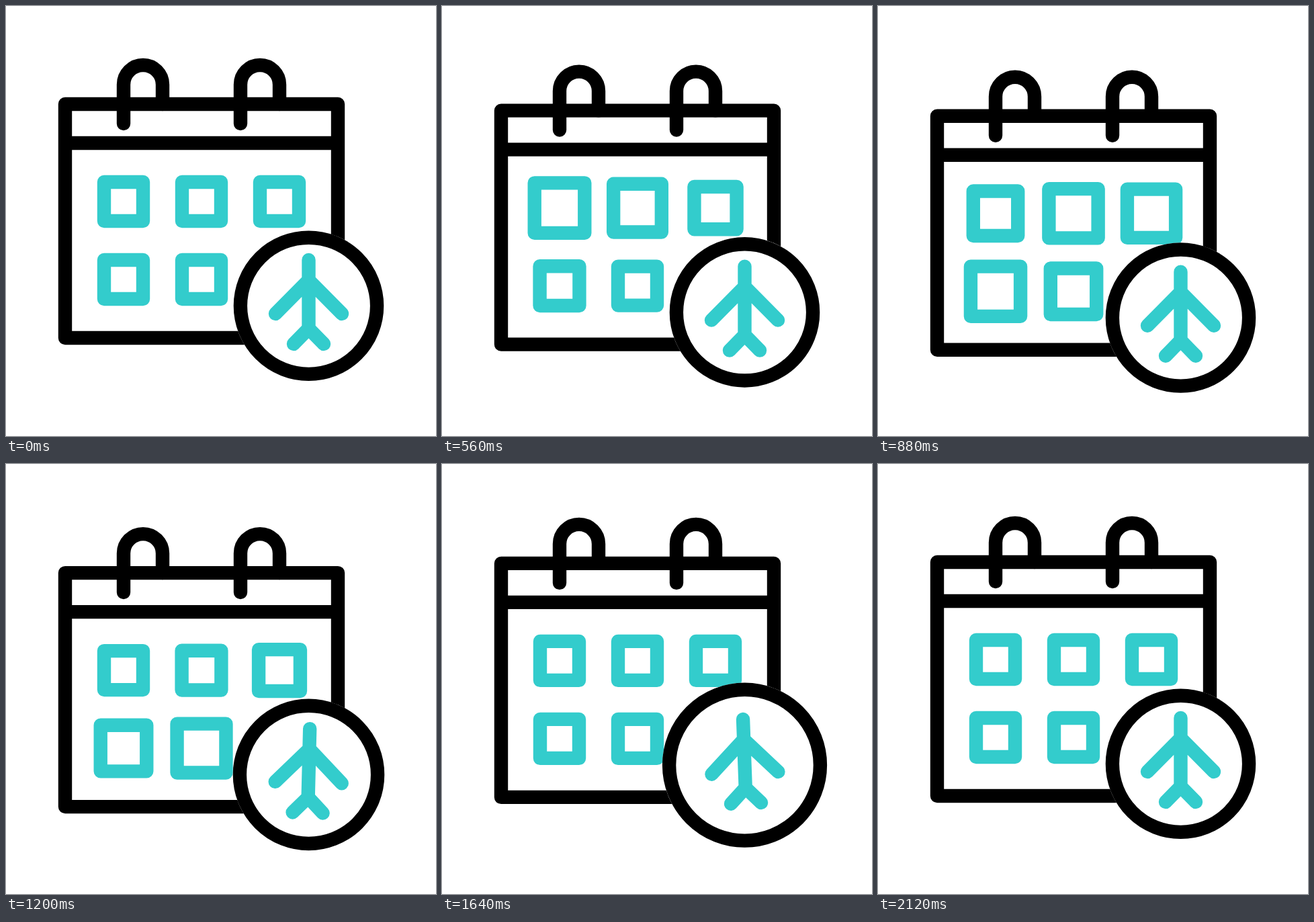
Animation, 640 px wide and 640 px high, one loop 2.24 s. Source, as an HTML page:

```html
<!DOCTYPE html>
<html lang="en">
<head>
<meta charset="utf-8">
<title>Travel calendar</title>
<style>
  html, body { margin: 0; width: 100%; height: 100%; overflow: hidden; background: #fff; }
  svg { display: block; width: 100%; height: 100%; }
  .line { fill: none; stroke: #000; stroke-width: 20.4; stroke-linecap: round; stroke-linejoin: round; }
  .accent { stroke: #33cccc; }
</style>
</head>
<body>
<svg viewBox="0 0 640 640">
  <g id="scene">
    <g class="line">
      <path d="M88 146H494V494H88ZM88 204H494"/>
      <path d="M175 175V117a29 29 0 0 1 58 0V146"/>
      <path d="M349 175V117a29 29 0 0 1 58 0V146"/>
    </g>
    <g id="days"></g>
    <circle id="disc" cx="450.5" cy="446.3" fill="#fff"/>
    <circle id="ring" class="line" cx="450.5" cy="446.3"/>
    <path id="plane" class="line accent" d="M450.5 378V480M401 458L450.5 408L500 458M428 503L450.5 480L473 503"/>
  </g>
</svg>
<script>
const LOOP = 2240, STEP = 40, PULSE = 435;
const byId = id => document.getElementById(id);
const scene = byId('scene'), disc = byId('disc'), ring = byId('ring'), plane = byId('plane');

// Center, start and end of the pulse in ms, growth in px
const days = [
  { x: 175, y: 291, start: 138, end: 1100, grow: 16.6 },
  { x: 291, y: 291, start: 232, end: 1269, grow: 15.6 },
  { x: 407, y: 291, start: 378, end: 1357, grow: 14.2 },
  { x: 175, y: 407, start: 490, end: 1453, grow: 16.5 },
  { x: 291, y: 407, start: 616, end: 1585, grow: 15.3 }
];
for (const day of days) {
  day.node = document.createElementNS('http://www.w3.org/2000/svg', 'path');
  day.node.setAttribute('class', 'line accent');
  byId('days').append(day.node);
}

// Cubic ease-in-out with handles at .42 and .58
function ease(u) {
  if (u <= 0) return 0;
  if (u >= 1) return 1;
  let lo = 0, hi = 1;
  for (let i = 0; i < 24; i++) {
    const s = (lo + hi) / 2, r = 1 - s;
    const x = 3 * r * r * s * 0.42 + 3 * r * s * s * 0.58 + s * s * s;
    if (x < u) lo = s; else hi = s;
  }
  return lo * lo * (3 - 2 * lo);
}

const ramp = (t, from, to) => ease((t - from) / (to - from));
const pulse = (t, start, end, span = PULSE) =>
  ramp(t, start, start + span) - ramp(t, end - span, end);

function draw(t) {
  const drop = 18 * pulse(t, 140, 1824, 808);
  scene.setAttribute('transform', `translate(0 ${drop})`);

  for (const { node, x, y, start, end, grow } of days) {
    const side = 58 + grow * pulse(t, start, end);
    node.setAttribute('d', `M${x - side / 2} ${y - side / 2}h${side}v${side}h${-side}z`);
  }

  const radius = 101.6 + 10.8 * pulse(t, 1108, 2100);
  ring.setAttribute('r', radius);
  disc.setAttribute('r', radius + 10.2);

  const tilt = 6.8 * (ramp(t, 1108, 1398) - 2 * ramp(t, 1398, 1808) + ramp(t, 1808, 2100));
  plane.setAttribute('transform', `rotate(${tilt} 450.5 446.3)`);
}

const origin = performance.now();
function tick() {
  const t = (performance.now() - origin) % LOOP;
  draw(Math.floor(t / STEP) * STEP);
  requestAnimationFrame(tick);
}
tick();
</script>
</body>
</html>
```
